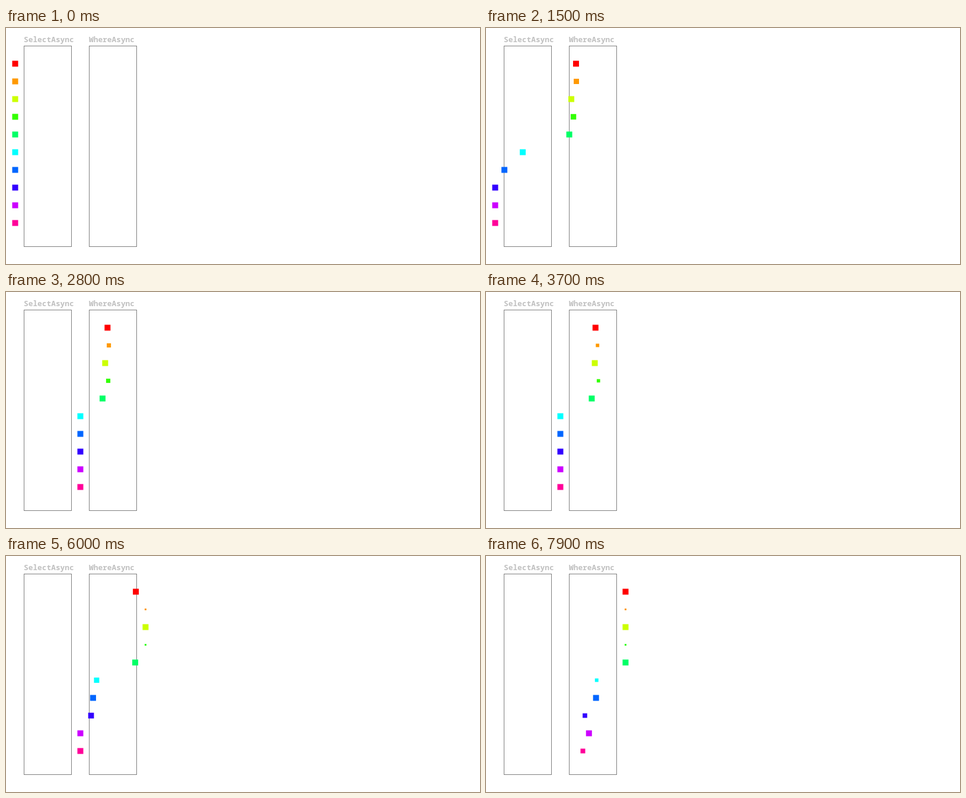
Animation of 800x400 px, one loop 8000 ms. Source, as an HTML page with a canvas:

```html
<!DOCTYPE html>
<html lang="en">
<head>
<meta charset="utf-8">
<title>Async pipeline</title>
<style>
  html, body { margin: 0; width: 100%; height: 100%; overflow: hidden; background: #fff; }
  canvas { display: block; }
</style>
</head>
<body>
<canvas id="stage" width="800" height="400"></canvas>
<script>
const ctx = document.getElementById("stage").getContext("2d");
const LOOP = 8000, STEP = 100, FIRST_START = 250;
const COUNT = 10, SIZE = 10, REJECTED_SIZE = 3;
const BOX_WIDTH = 80, GAP = 15;

// Each stage runs up to `limit` items at once; `work` is the ms each item needs.
const select = {
  label: "SelectAsync", left: 30.5, limit: 2,
  work: [485, 512, 571, 371, 364, 493, 441, 321, 570, 310]
};
const where = {
  label: "WhereAsync", left: 140.5, limit: 5,
  work: [5355, 4923, 4446, 4167, 4643, 4494, 3922, 6500, 4233, 6300]
};

// First come, first served: every item takes the worker that is free earliest.
function schedule({ limit, work }, ready) {
  const workers = Array(limit).fill(0);
  const runs = [];
  const queue = [...ready.keys()].sort((a, b) => ready[a] - ready[b]);
  for (const i of queue) {
    const worker = workers.indexOf(Math.min(...workers));
    const start = Math.max(ready[i], workers[worker]);
    const end = workers[worker] = start + work[i];
    runs[i] = { start, end };
  }
  return runs;
}

const selectRuns = schedule(select, Array(COUNT).fill(FIRST_START));
const whereRuns = schedule(where, selectRuns.map(run => run.end));

const progress = (t, { start, end }) => Math.min(1, Math.max(0, (t - start) / (end - start)));

// Items wait beside a box, cross it linearly, then wait on the far side.
function positionIn({ left }, run, t) {
  if (t < run.start) return left - GAP;
  if (t >= run.end) return left + BOX_WIDTH + GAP;
  return left + BOX_WIDTH * progress(t, run);
}

function drawBox({ label, left }) {
  ctx.strokeStyle = "#808080";
  ctx.strokeRect(left, 30.5, BOX_WIDTH, 340);
  ctx.fillStyle = "#c0c0c0";
  ctx.font = 'bold 12.83px "Noto Sans Mono", monospace';
  ctx.fillText(label, left - 0.5, 24);
}

function drawItem(i, t) {
  const x = t < whereRuns[i].start
    ? positionIn(select, selectRuns[i], t)
    : positionIn(where, whereRuns[i], t);
  const y = 60.5 + 30 * i;
  const rejected = i % 2 === 1;
  const shrink = rejected ? progress(t, whereRuns[i]) : 0;
  const size = SIZE + (REJECTED_SIZE - SIZE) * shrink;
  ctx.fillStyle = `hsl(${360 / COUNT * i}, 100%, 50%)`;
  ctx.fillRect(x - size / 2, y - size / 2, size, size);
}

function draw(elapsed) {
  const t = Math.floor((elapsed % LOOP) / STEP) * STEP;
  ctx.clearRect(0, 0, 800, 400);
  drawBox(select);
  drawBox(where);
  for (let i = 0; i < COUNT; i++) drawItem(i, t);
}

const origin = performance.now();
function tick() {
  draw(performance.now() - origin);
  requestAnimationFrame(tick);
}
tick();
</script>
</body>
</html>
```
